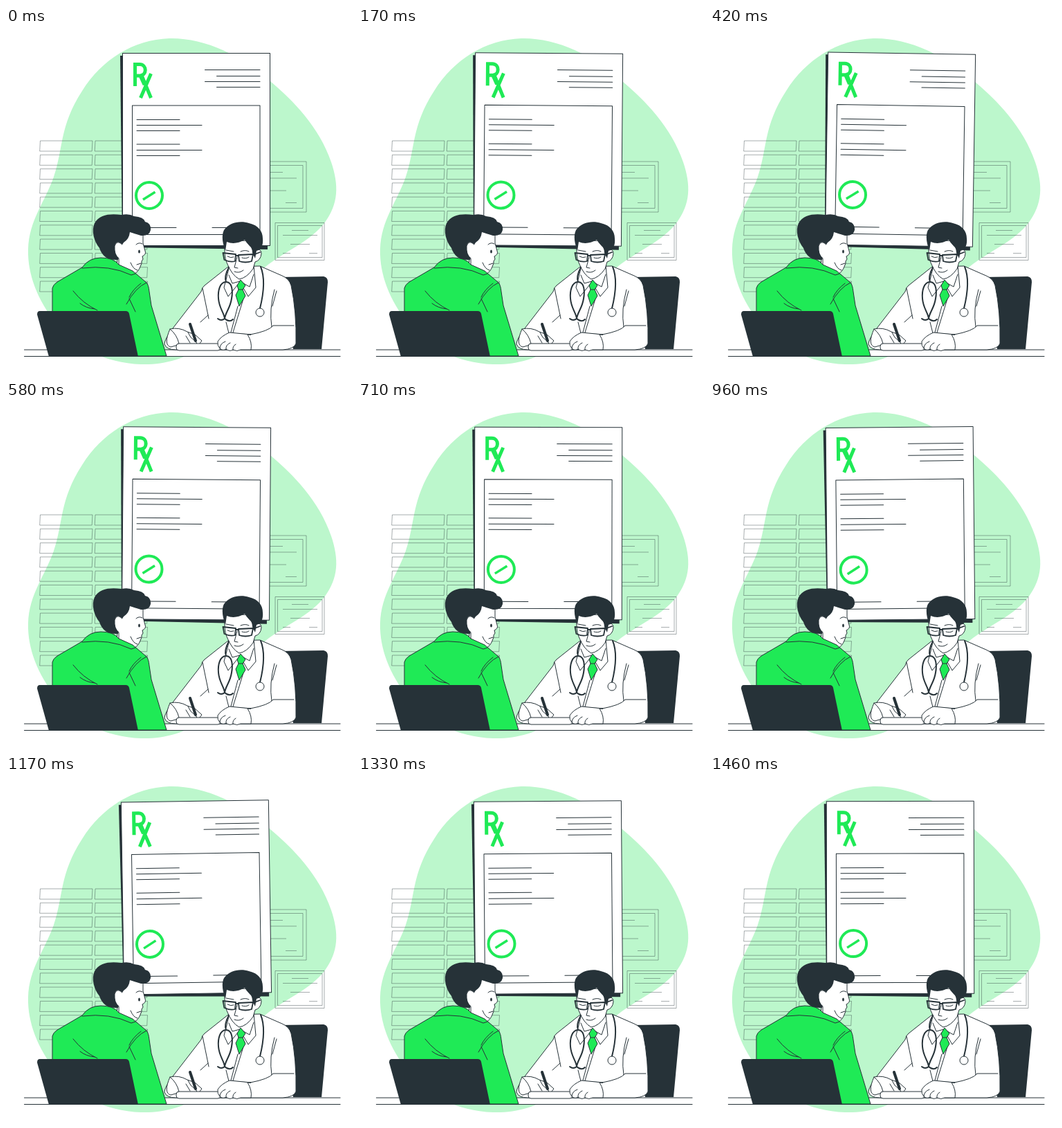
These frames come from a looping animation (500x500 px, 1.5 s). An HTML page:

```html
<!DOCTYPE html>
<html lang="en">
<head>
<meta charset="utf-8">
<title>Prescription</title>
<style>
  html, body { margin: 0; height: 100%; overflow: hidden; background: #fff; }
  svg { display: block; width: 100%; height: 100%; }
  .line { fill: none; stroke: #263238; stroke-linecap: round; stroke-linejoin: round; }
  .white { fill: #fff; stroke: #263238; stroke-linejoin: round; }
  .green { fill: #1fea56; stroke: #263238; stroke-linejoin: round; }
  .dark { fill: #263238; }
  .mark { fill: none; stroke: #1fea56; }
  .faint { fill: none; stroke: #263238; stroke-width: .8; opacity: .5; }
  .thick { stroke-width: 2; }
</style>
</head>
<body>
<svg viewBox="0 0 500 500">
  <path fill="#bcf7cc" d="M110 91C139 45 184 17 236 15C288 14 338 39 382 77C414 104 453 143 470 194C481 227 481 254 460 282C439 309 404 322 375 345C332 377 330 425 284 460C260 478 228 487 195 486C143 484 101 462 72 426C46 394 31 356 32 320C33 278 57 250 69 215C83 174 77 142 110 91Z"/>

  <path id="tiles" class="faint"/>
  <path class="faint" d="M360 193H434V266H360ZM360 198.500H429V260.500H360ZM370 208.500H400M370 217H420M370 235H405M404 252.500H420
    M389 281.500H460V335.500H389ZM392.500 285.500H457V331.500H392.500ZM413 292.500H437M400 299.500H450M411 312.500H439M400 325.500H411M438 325.500H450"/>

  <g id="paper">
    <path class="dark" d="M165 40H381L378 320L168 317Z"/>
    <path class="white" d="M168.500 36.500H381.500V314.500H168.500Z"/>
    <path class="line" d="M182.500 112H367V298.500H182.500Z
      M287.500 60.500H367M304.500 69.500H367M287.500 77.500H367M304.500 85.500H367
      M189 132.500H251M189 140.500H283M189 148.500H251M189 168H251M189 176.500H283M189 184.500H251
      M200 288.500H246M298 288.500H330"/>
    <path class="mark" stroke-width="5" d="M186.500 84V52.500H193C204 52.500 204 69 193 69H187M194 69L200 82M195 66L209.500 101M209.500 66L194.500 101"/>
    <circle class="mark" stroke-width="4" cx="207" cy="242" r="19"/>
    <path class="mark" stroke-width="3.500" d="M198 248L215.500 237"/>
  </g>

  <path class="white" d="M26 465H483V474H26Z" stroke="none" style="stroke:none"/>
  <path class="line" d="M26.500 465H483M26.500 474.500H483"/>

  <g id="doctor">
    <path class="dark" d="M395 360L459 359Q465 360 465 367L456 464H415Z"/>
    <path class="white" d="M321 345L287 372Q283 375 282 381L241 434Q229 450 229 457Q232 465 246 465H400Q416 464 419 456Q420 410 412 372Q409 362 399 358L367 344Z"/>
    <path class="line" d="M284 376L293 420M281 425L292 415M388 378Q380 407 384 432M391 380L385 402M353 443Q380 438 386 430L416 430M323 441L354 443M322 441L318 425M345 385L328 440M335 402L325 440"/>
    <path class="white" d="M323 343L319 360L315 375L321 388L338 367L350 388L361 375L358 343Z"/>
    <path class="line" d="M322 357L327 369L338 366L352 374L358 356"/>
    <path class="green" d="M334 372L339 364L346 372L342 378L346 387L337 402L332 386L336 378Z"/>
    <path class="line" d="M336 378H342"/>

    <path class="white" d="M316 308Q315 330 319 339Q326 357 337 363Q348 361 357 348L360 338Q368 336 369 326Q369 318 361 321L355 307Z"/>
    <path class="dark" d="M317 322C313 311 311 300 315 292C323 280 340 278 351 282C365 285 371 294 371 304C372 313 369 321 362 322L360 333L356 325Q356 318 352 315Q347 310 345 306Q331 314 319 309Z"/>
    <path class="line" style="stroke-width:1.800" d="M313.500 325L332 327L331 337Q324 339 315.500 335ZM336 328L357 327L355 337Q346 340 337 337ZM332 329H336M357 328L367 324"/>
    <path class="line" d="M318 321L329 323M339 323Q346 320 351 323M320 330Q325 333 329 331M341 332Q347 334 351 331M334 331L330 346L335 347M330 352Q337 355 343 350"/>

    <path class="line thick" d="M322 346Q315 359 318 367M318 367C309 367 306 380 307 391C308 405 315 411 316 420M318 367C327 367 328 380 326 391C324 405 317 411 316 420M316 420Q311 424 306 420M316 420Q323 426 328 421M368 345C375 362 372 385 367 405"/>
    <circle class="white" cx="367" cy="411" r="6"/>

    <path class="white" d="M237 435Q250 432 262 439L273 443L283 452L279 457H252L238 461Q227 458 237 435Z"/>
    <path class="line" d="M237 435Q247 443 250 456M263 440L267 447L275 454M260 445L266 455"/>
    <path class="line" style="stroke-width:4" d="M266 428L274 452"/>
    <path class="line" d="M274 452L276 457"/>
    <rect class="white" x="246" y="456" width="64" height="10" rx="4"/>
    <path class="white" d="M354 443L323 440Q311 445 306 453Q305 459 309 463Q313 467 318 464Q323 468 328 465Q334 468 339 465H354Q356 454 349 443Z"/>
    <path class="line" d="M309 463Q309 456 317 453M318 464Q317 458 324 455M328 465Q327 460 332 457"/>
  </g>

  <g id="patient">
    <path class="white" d="M163 308L160 345L184 356Q191 353 194 345L196 340Q195 337 198 334L197 330Q203 327 201 322L198 311L198 295L177 294Z"/>
    <path class="dark" d="M162 335C147 336 139 330 135 318C127 308 123 293 128 282C135 269 151 268 167 270Q178 268 185 272Q199 273 201 280Q210 282 209 292Q207 301 195 300Q185 297 179 295Q178 305 170 310L166 316Z"/>
    <path class="white" style="stroke:none" d="M167 312Q160 306 157 315Q156 328 164 333L171 325Z"/>
    <path class="line" d="M167 312Q160 306 157 315Q156 328 163 333L163 342M188 313Q192 309 197 312M189 342L195 340M180 339Q184 349 190 350"/>
    <ellipse class="dark" cx="192.500" cy="323" rx="1.400" ry="2.500"/>
    <path class="green" d="M67 412V376Q68 371 74 367L110 346Q120 332 137 332Q156 332 163 342L183 351L203 368Q206 371 207 381L210 401L232 474H170Z"/>
    <path class="line" d="M110 347Q150 342 181 357L187 355M97 380Q111 398 132 408M107 398Q116 405 128 406M203 368Q187 375 174 399M195 369Q183 378 178 389M187 410L178 391"/>
    <path class="dark" d="M49 409H173Q177 409 178 413L191 475H62L45 414Q45 409 49 409Z"/>
  </g>
</svg>
<script>
  const PERIOD = 1500;
  const paper = document.getElementById('paper');

  let tiles = '';
  for (let row = 0; row < 11; row++) {
    const y = 163 + row * 20.3;
    for (const x of [49.5, 129]) tiles += `M${x} ${y}h75.500l-.8 15h-75.500Z`;
  }
  document.getElementById('tiles').setAttribute('d', tiles);

  // Linear swing: 0 to 1 degree, to -1 degree, back to 0.
  function swing(p) {
    if (p < .25) return 4 * p;
    return p < .75 ? 2 - 4 * p : 4 * p - 4;
  }

  function draw() {
    const angle = swing(performance.now() % PERIOD / PERIOD);
    paper.setAttribute('transform', `rotate(${angle} 273 178)`);
    requestAnimationFrame(draw);
  }
  draw();
</script>
</body>
</html>
```
